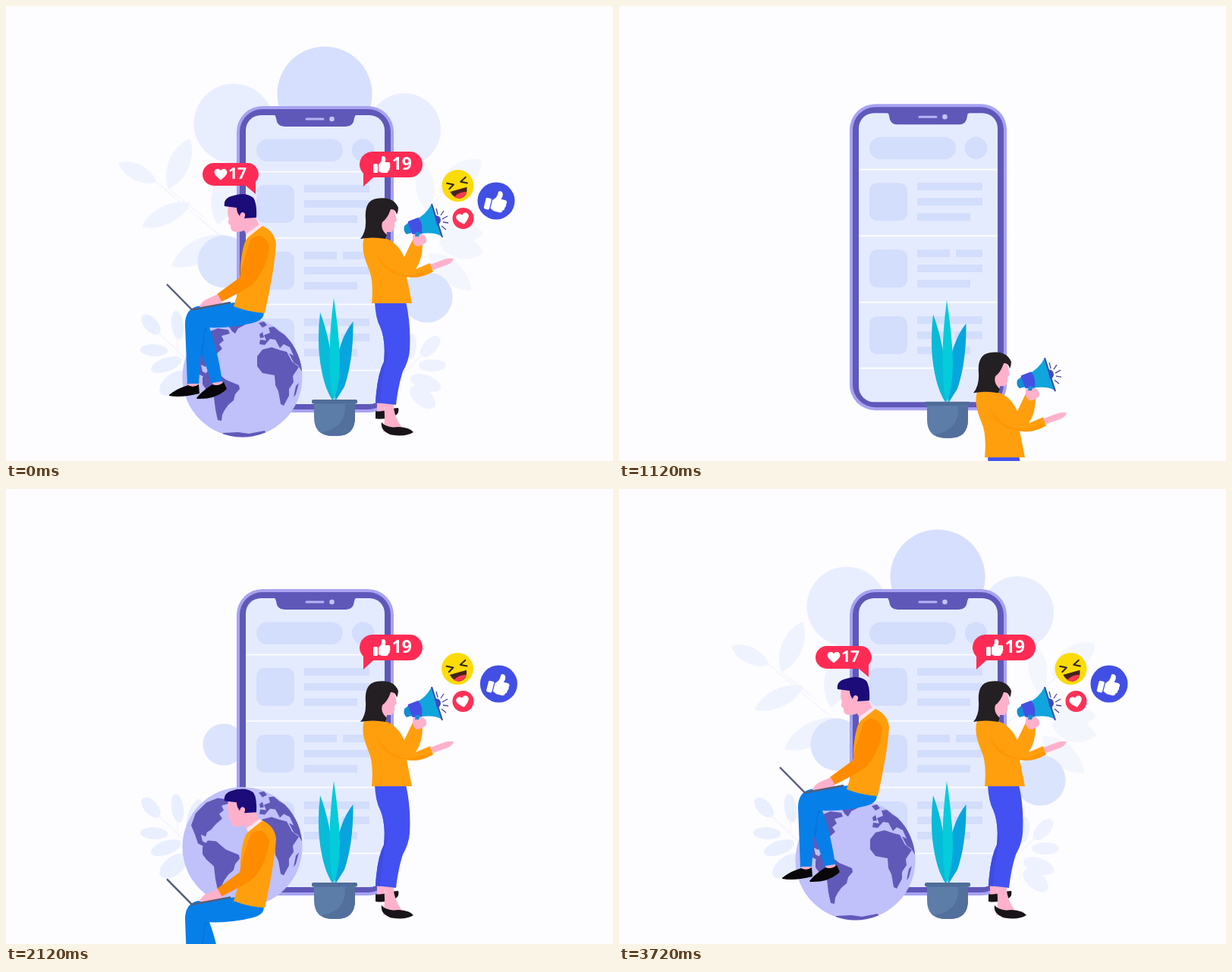
An HTML page for the animation above (4640 ms loop, 800 px wide and 600 px high).

```html
<!DOCTYPE html>
<html lang="en">
<head>
<meta charset="utf-8">
<title>Social campaign</title>
<style>
html, body { margin: 0; width: 100%; height: 100%; overflow: hidden; background: #fdfcff; }
svg { display: block; width: 800px; height: 600px; }
text { font: 700 23px "Open Sans", "Noto Sans", sans-serif; fill: #fff; }
</style>
</head>
<body>
<svg viewBox="0 0 800 600">
<defs>
  <path id="heart" d="M0 8C-9 1-9-2-8-4C-6-8-1-7 0-4C1-7 6-8 8-4C9-2 9 1 0 8Z"/>
  <g id="thumb">
    <rect x="-11" y="-1" width="6" height="12" rx="1.5"/>
    <path d="M-4 0C0-3 0-6 0-10C4-13 7-8 4.500-3H9C11-3 12-1 11 1C12 3 11 4 10.500 5C11 7 10 8 9 8C9 10 8 11 6 11H0L-4 9Z"/>
  </g>
  <clipPath id="ball"><circle cx="311.500" cy="489.500" r="79"/></clipPath>
</defs>

<!-- backdrop -->
<g id="leavesL" data-s="2150,300,320" fill="#eff3fe"></g>
<g id="leavesR" data-s="3080,530,300" fill="#f4f6fe"></g>
<g id="branchL" data-s="1800,240,475" fill="#e9effe"></g>
<g id="branchR" data-s="3260,530,480" fill="#eef2fe"></g>
<circle data-s="2310,300,155" cx="300" cy="155" r="52.500" fill="#e9eefe"/>
<circle data-s="2800,525,163" cx="525" cy="163" r="48" fill="#e9eefe"/>
<circle data-s="1955,287,337" cx="287" cy="337" r="34.500" fill="#dbe4fd"/>
<circle data-s="3000,555,384" cx="555" cy="384" r="33.500" fill="#dbe4fd"/>
<circle data-s="2395,420,116" cx="420" cy="116" r="62.500" fill="#d6dffd"/>

<g id="phone" data-y="535,470">
  <rect x="304" y="132" width="207" height="404" rx="34" fill="#a8a2f2"/>
  <rect x="308" y="136" width="199" height="396" rx="30" fill="#5f58b9"/>
  <rect x="316" y="144" width="183" height="381" rx="20" fill="#e5ebfe"/>
  <path d="M353 143H462Q459 145 459 148Q458 159 448 159H367Q357 159 356 148Q356 145 353 143Z" fill="#5f58b9"/>
  <path d="M396 149H418" stroke="#b7b2f3" stroke-width="3" stroke-linecap="round"/>
  <circle cx="429.500" cy="149" r="3.300" fill="#c5c2f6"/>
  <path d="M316 218.500H499M316 306H499M316 393.500H499M316 480.500H499" stroke="#fff" stroke-width="1.600"/>
  <g id="feed" fill="#d3ddfc">
    <rect x="330" y="175.500" width="114" height="29.500" rx="14.700"/>
    <circle cx="470.500" cy="190" r="14.700"/>
  </g>
</g>

<g id="globe" data-y="1895,250">
  <circle cx="311.500" cy="489.500" r="79" fill="#c0c0fb"/>
  <g clip-path="url(#ball)" fill="#6159b8">
    <path d="M244 461L250 445L264 431L279 425L293 427L295 432L284 435L287 441L281 446L285 452L276 460L270 467L265 470L263 476L257 473L259 482L267 486L263 490L253 485L249 473Z"/>
    <path d="M259 490L266 481L277 482L285 489L290 493L307 500L308 505L302 512L300 520L293 526L288 533L285 539L284 547L279 546L276 532L274 515L264 506L259 499Z"/>
    <path d="M292 420L304 413L318 415L314 421L306 425L302 432L298 429Z"/>
    <path d="M331 462L338 453L350 450L362 454L370 456L377 469L386 476L378 488L379 496L373 505L373 514L366 527L362 525L359 508L355 500L354 487L338 484L331 475Z"/>
    <path d="M334 446L335 440L343 441L340 434L348 431L346 424L353 423L360 429L373 437L392 470L390 482L385 474L379 470L373 458L379 461L374 450L366 446L361 451L355 440L348 439L341 447Z"/>
    <path d="M333 418L340 416L344 421L338 424ZM334 433L338 430L340 437L335 438ZM382 501L386 497L382 512L379 516ZM286 563L306 562L320 564L341 560L345 570L284 570Z"/>
  </g>
</g>

<g id="man" data-y="2015,352">
  <path d="M293 264Q291 276 294 281Q291 287 296 289Q295 298 304 298Q310 298 314 296L317 302L335 291L328 277L311 264Z" fill="#ffb1cb"/>
  <path d="M288 264Q286 253 300 250Q316 245 326 253Q331 260 330 279L314 280Q317 273 312 272Q309 272 308 277Q304 272 304 266Q295 265 288 264Z" fill="#1b0c79"/>
  <path d="M317 300L334 288L340 291L319 306Z" fill="#ffe4e8"/>
  <path d="M339 401Q343 413 325 418Q298 425 268 424Q278 449 285 495L271 499Q264 474 257 457L254 499H239Q237 445 236 420Q236 400 252 396L302 391Z" fill="#077fe9"/>
  <path d="M270 424Q260 424 262 437L259 461L257 457L262 424Z" fill="#0875dc"/>
  <path d="M338 290Q354 297 356 314Q354 347 341 405Q321 404 300 396Q310 367 309 343Q312 311 319 305Z" fill="#ff9f0e"/>
  <path d="M323 307Q339 296 347 316Q344 346 325 367Q307 379 282 391L278 380L308 358Q313 333 323 307Z" fill="#ff8b00"/>
  <path d="M279 380L268 385Q257 389 255 397Q266 399 285 391Z" fill="#ffb1cb"/>
  <path d="M212 367L245 400.500L296 391" fill="none" stroke="#535d78" stroke-width="2.400"/>
  <path d="M240 498H254V502L240 503ZM272 497L285 495L286 501L273 502Z" fill="#ffb1cb"/>
  <path d="M215 513Q224 505 240 500Q247 504 254 499L255 511Q231 517 215 514ZM251 517Q258 508 272 499Q280 502 287 496L291 505Q277 519 252 518Z" fill="#080608"/>
</g>

<g id="plant" data-y="762,215">
  <path d="M414 404Q409 447 416 481Q421 507 431 521L433 493Q427 437 414 404Z" fill="#08bbd9"/>
  <path d="M457.500 416Q458 467 446 502L434 521L432 490Q438 439 457.500 416Z" fill="#07a5de"/>
  <path d="M432 385Q425 439 427 477Q427 504 432 520Q439 502 440 472Q440 438 432 385Z" fill="#04ccdb"/>
  <path d="M406 522H460V542Q460 567 436 567H430Q406 567 406 542Z" fill="#5d7da9"/>
  <path d="M460 525V542Q460 567 436 567H430Q422 567 416 562Q449 557 447 525Z" fill="#536f9b"/>
  <rect x="403" y="519" width="60" height="5.500" rx="2" fill="#4f6d99"/>
</g>

<g id="woman" data-y="1040,350">
  <path d="M489 520H498V536H489Z" fill="#ffb1cb"/>
  <path d="M487 534Q495 536 504 531L517 530Q519 538 511 541Q499 546 487 544Z" fill="#191419"/>
  <path d="M497 520H511Q509 539 522 556L497 562Q501 541 497 520Z" fill="#ffb1cb"/>
  <path d="M495 549Q502 557 517 555Q533 556 537 562Q526 569 506 565Q493 560 495 549Z" fill="#191419"/>
  <path d="M486 390H527Q534 420 532 454Q531 468 523 482Q517 500 514 526L487 523Q489 487 498 469Q501 441 493 423Q487 412 486 390Z" fill="#4351f2"/>
  <path d="M498 469Q501 441 493 423Q500 438 502 463Q495 489 493 524L487 523Q489 487 498 469Z" fill="#3f4ce4"/>
  <path d="M472 306Q487 301 504 308Q517 314 525 331L537 306L549 314Q549 334 540 347L559 339L563 350Q543 361 528 357L535 392H482Q485 360 477 344Q467 320 472 306Z" fill="#ff9f0e"/>
  <path d="M488 325Q501 350 526 355Q543 355 557 347L563 350Q544 361 528 357L513 354Q494 346 488 325Z" fill="#ff9700"/>
  <path d="M559 341L575 335Q582 332 590 333Q588 340 577 343L563 348Z" fill="#ffb1cb"/>
  <path d="M497 264Q510 260 513 274L515 283L512 286Q513 295 508 298H502L501 306L486 306L494 282Z" fill="#ffb1cb"/>
  <path d="M474 281Q472 257 488 254Q510 250 517 266Q517 271 515 275Q513 267 507 268Q503 280 496 285Q493 294 502 302L500 307Q483 304 467 307Q475 298 474 281Z" fill="#231f22"/>
  <path d="M536 304Q536 300 544 300Q555 301 554 311Q548 317 541 317Q535 313 536 304Z" fill="#ffb1cb"/>
  <path d="M539 282Q553 276 561 261L575 304Q563 297 544 301Z" fill="#10a5dc"/>
  <path d="M530 284L543 279Q550 286 548 300L536 301Q528 294 530 284Z" fill="#4450e4"/>
  <path d="M525 290L530 286L535 299L528 301Q523 297 525 290ZM540 298L546 298L544 304H539Z" fill="#108ed2"/>
  <path d="M561 261L575 305" stroke="#344bb1" stroke-width="2"/>
  <path d="M565 276Q573 276 573 283Q572 288 568 289Z" fill="#4048bd"/>
  <path d="M569 275L567 267M573 276L577 270M575 281L582 277M576 285L583 286M574 290L580 295" stroke="#46489c" stroke-width="1.300"/>
</g>

<g data-x="1255,212">
  <circle cx="602.500" cy="280" r="14" fill="#fd3155"/>
  <use href="#heart" transform="translate(602 280) rotate(-12)" fill="#fff"/>
</g>
<g data-x="1475,225">
  <circle cx="595.500" cy="237" r="21" fill="#fcdc08"/>
  <g transform="translate(595.500 237) rotate(-16)" fill="none" stroke="#332421" stroke-width="2" stroke-linecap="round" stroke-linejoin="round">
    <path d="M-13-7L-5-3L-12 1M13-8L5-4L13 0"/>
    <path d="M-12 5H11Q9 17-1 17Q-10 15-12 5Z" fill="#48221d" stroke="none"/>
    <path d="M-9 13Q0 8 9 11Q5 17-1 17Q-6 16-9 13Z" fill="#fc3b4f" stroke="none"/>
  </g>
</g>
<g data-x="1695,180">
  <circle cx="646" cy="257" r="24.500" fill="#424fe4"/>
  <use href="#thumb" transform="translate(646 257) rotate(14) scale(1.250)" fill="#fff"/>
</g>

<g data-s="1650,507,209">
  <path d="M482 192H532A17 17 0 0 1 532 226H484L471 238V221A17 17 0 0 1 482 192Z" fill="#fe2c55"/>
  <use href="#thumb" transform="translate(495 209)" fill="#fff"/>
  <text x="508.500" y="216">19</text>
</g>
<g data-s="2372,296,222">
  <path d="M274 207H318A15 15 0 0 1 329 232V248L316 237H274A15 15 0 0 1 274 207Z" fill="#fe2c55"/>
  <use href="#heart" transform="translate(283 221.500)" fill="#fff"/>
  <text x="293" y="228" style="font-size:21px">17</text>
</g>
</svg>
<script>
const $ = id => document.getElementById(id);
const add = (id, html) => $(id).insertAdjacentHTML('beforeend', html);

function leaf(id, x1, y1, x2, y2, w) {
  const dx = x2 - x1, dy = y2 - y1, len = Math.hypot(dx, dy);
  const nx = -dy / len * w, ny = dx / len * w;
  const at = (f, k) => `${x1 + dx * f + nx * k} ${y1 + dy * f + ny * k}`;
  add(id, `<path d="M${x1} ${y1}C${at(.25, 1)} ${at(.75, 1)} ${x2} ${y2}C${at(.75, -1)} ${at(.25, -1)} ${x1} ${y1}Z"/>`);
}
const oval = (id, x, y, rx, ry, a) =>
  add(id, `<ellipse cx="${x}" cy="${y}" rx="${rx}" ry="${ry}" transform="rotate(${a} ${x} ${y})"/>`);
const stem = (id, d) => add(id, `<path d="${d}" fill="none" stroke="#f1f4fe" stroke-width="1.200"/>`);

[[148, 207, 198, 232, 14], [242, 175, 214, 241, 18], [179, 291, 243, 260, 16],
 [218, 343, 292, 303, 20], [297, 208, 279, 288, 22]].forEach(l => leaf('leavesL', ...l));
stem('leavesL', 'M198 232L305 322M214 241L260 278');
[[627, 203, 571, 246, 22], [548, 204, 556, 271, 16], [629, 300, 562, 294, 20],
 [613, 375, 558, 326, 19], [629, 325, 570, 311, 20]].forEach(l => leaf('leavesR', ...l));
stem('leavesR', 'M600 225L510 310');

[[191, 420, 16, 9, 48], [226, 421, 8, 19, -8], [195, 454, 18, 8, 3],
 [211, 473, 21, 9, -20], [221, 497, 22, 12, -38], [248, 430, 8, 22, 20]].forEach(o => oval('branchL', ...o));
stem('branchL', 'M196 426L245 473M226 434V452');
[[559, 449, 17, 9, -48], [562, 474, 18, 8, 0], [553, 497, 21, 10, 20],
 [549, 516, 20, 11, 40], [534, 449, 7, 17, 4]].forEach(o => oval('branchR', ...o));
stem('branchR', 'M561 447L516 492');

// each line of a feed card: pairs of x and width
const full = [393, 86], short = [393, 70];
const cards = [[full, full, short], [[393, 43, 444, 35], full, short], [full, [393, 42, 442, 37], short]];
cards.forEach((lines, i) => {
  const top = 236 + i * 88;
  let html = `<rect x="330" y="${top}" width="50" height="50" rx="10"/>`;
  lines.forEach((bars, j) => {
    for (let k = 0; k < bars.length; k += 2)
      html += `<rect x="${bars[k]}" y="${top + j * 20}" width="${bars[k + 1]}" height="10"/>`;
  });
  add('feed', html);
});

// fast arrival, then a damped swing around the resting place
function spring(dt) {
  const rise = 165, s = dt - rise;
  if (s < 0) return 1 - (dt / rise) ** 1.2;
  return s > 900 ? 0 : -.12 * Math.exp(-.0071 * s) * Math.sin(Math.PI * s / 170);
}

const parts = [...document.querySelectorAll('[data-x],[data-y],[data-s]')].map(el => {
  const kind = ['x', 'y', 's'].find(k => el.dataset[k]);
  return { el, kind, v: el.dataset[kind].split(',').map(Number) };
});

function pose({ el, kind, v: [start, a, b] }, t) {
  const dt = t - start;
  el.style.display = dt > 0 ? '' : 'none';
  if (dt <= 0) return;
  if (kind === 's') {
    const u = Math.min(1, dt / 300), k = 1 - (1 - u) ** 2;
    el.setAttribute('transform', `translate(${a} ${b}) scale(${k}) translate(${-a} ${-b})`);
    el.setAttribute('opacity', Math.min(1, .25 + u * 1.3));
  } else {
    const d = a * spring(dt);
    el.setAttribute('transform', kind === 'x' ? `translate(${d} 0)` : `translate(0 ${d})`);
  }
}

const begin = performance.now();
function draw() {
  let t = Math.max(0, performance.now() - begin) % 4640;
  t = Math.floor(t / 40) * 40;
  if (t < 40 || t >= 3720) t = 9999;
  parts.forEach(p => pose(p, t));
  requestAnimationFrame(draw);
}
draw();
</script>
</body>
</html>
```
